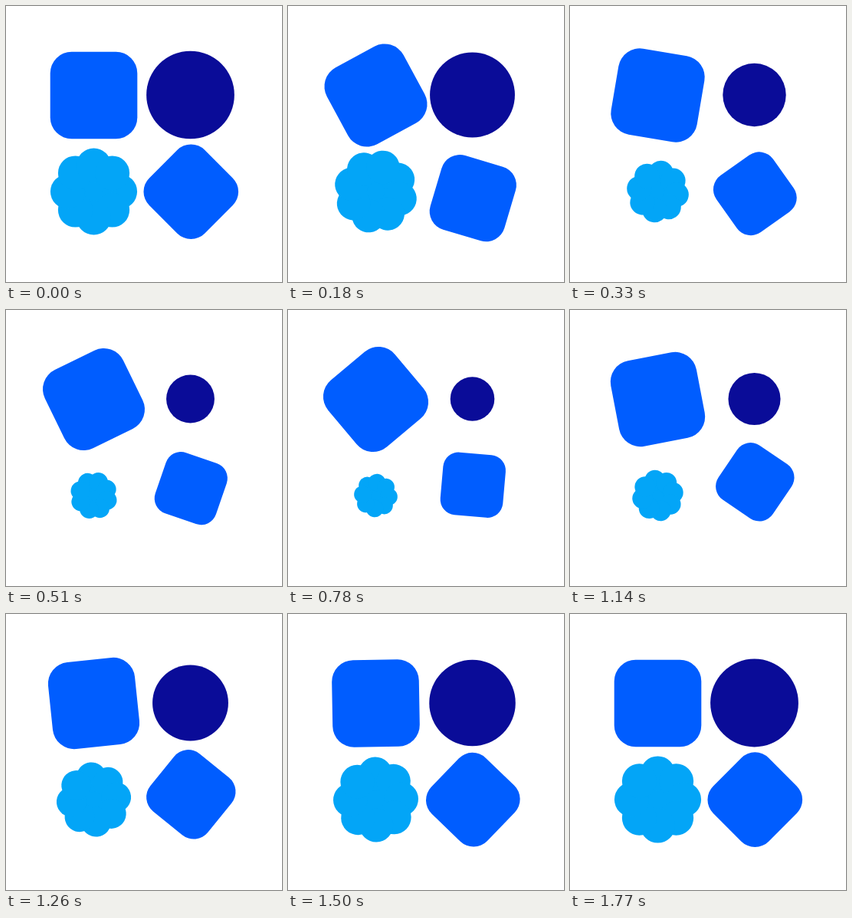
An HTML page that plays this animation: 360x360 px, repeating every 1800 ms.

```html
<!DOCTYPE html>
<html lang="en">
<head>
<meta charset="utf-8">
<title>Four shapes</title>
<style>
  html, body { margin: 0; width: 100%; height: 100%; overflow: hidden; background: #fff; }
  svg { display: block; width: 100vw; height: 100vh; }
</style>
</head>
<body>
<svg viewBox="0 0 360 360">
  <rect id="square" x="-56.8" y="-56.8" width="113.6" height="113.6" rx="28" fill="#005dff"/>
  <circle id="disc" r="57.4" fill="#0a0c98"/>
  <g id="flower" fill="#03a5f7"><circle r="40"/></g>
  <rect id="diamond" x="-51.1" y="-51.1" width="102.2" height="102.2" rx="25.2" fill="#005dff"/>
</svg>
<script>
const LOOP = 1800, STEP = 30, PETALS = 8;
const byId = id => document.getElementById(id);
const square = byId('square'), disc = byId('disc');
const flower = byId('flower'), diamond = byId('diamond');

for (let i = 0; i < PETALS; i++) {
  const petal = document.createElementNS('http://www.w3.org/2000/svg', 'circle');
  const a = i * 2 * Math.PI / PETALS;
  petal.setAttribute('cx', 34 * Math.cos(a));
  petal.setAttribute('cy', 34 * Math.sin(a));
  petal.setAttribute('r', 22.6);
  flower.append(petal);
}

const smooth = s => s * s * (3 - 2 * s);
const cubicOut = s => 1 - (1 - s) ** 3;

// cubic-bezier(x1, 0, x2, 1), solved by bisection
const bezier = (x1, x2) => s => {
  let lo = 0, hi = 1;
  for (let i = 0; i < 30; i++) {
    const u = (lo + hi) / 2, v = 1 - u;
    if (3 * u * v * (x1 * v + x2 * u) + u ** 3 < s) lo = u; else hi = u;
  }
  return smooth(lo);
};
const snap = bezier(0.67, 0.03);
const swing = bezier(0.33, 0.3);

// Eased progress from 0 to 1 between two times
const ramp = (t, from, to, ease = smooth) =>
  ease(Math.min(1, Math.max(0, (t - from) / (to - from))));

function place(el, x, y, angle, scale) {
  el.setAttribute('transform', `translate(${x} ${y}) rotate(${angle}) scale(${scale})`);
}

function draw(t) {
  const shrink = ramp(t, -30, 870, snap) - ramp(t, 855, 1755, snap);
  // Swing past a quarter turn, then settle back on it
  const turn = -130 * ramp(t, 0, 780, swing) + 40 * ramp(t, 780, LOOP, cubicOut);
  // Dip, rise in two stages, return
  const drift = 8.5 * ramp(t, 0, 180) - 20.5 * ramp(t, 180, 600)
    - 14.5 * ramp(t, 720, 980) + 26.5 * ramp(t, 980, 1400);

  place(square, 114.5, 116.5, turn, 1);
  place(disc, 240.5, 116, 0, 1 - 0.5 * shrink);
  place(flower, 114.5, 242, turn, 1 - 0.5 * shrink);
  place(diamond, 241.3, 242.2 + drift, 45 + turn, 1 - 0.2 * shrink);
}

const start = performance.now();
function tick() {
  const t = (performance.now() - start) % LOOP;
  draw(Math.floor(t / STEP) * STEP);
  requestAnimationFrame(tick);
}
tick();
</script>
</body>
</html>
```
